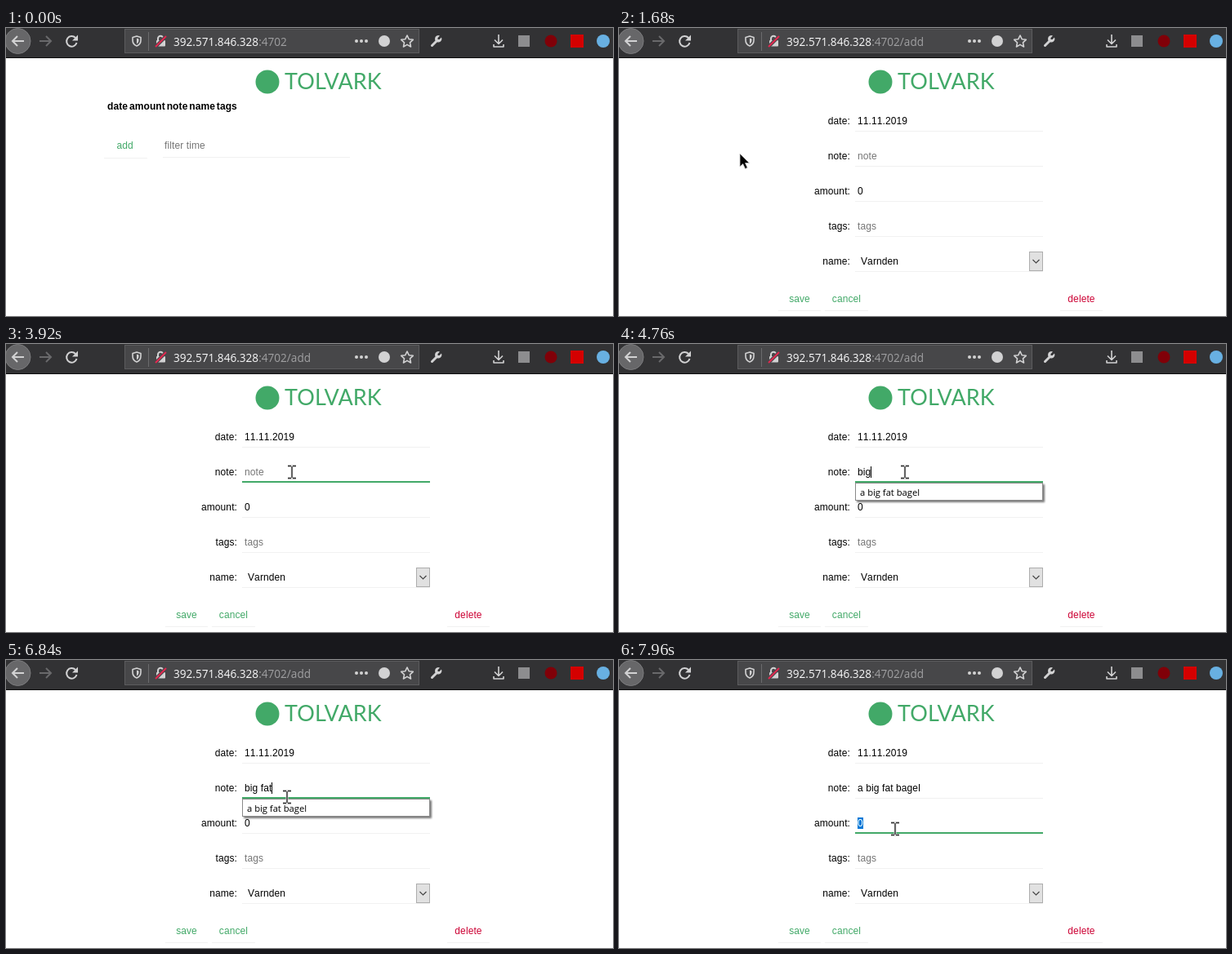
Animation of 743 by 353 pixels, one loop 8 s. Source, as an HTML page:

```html
<!DOCTYPE html>
<html lang="en">
<head>
<meta charset="utf-8">
<title>Adding an entry</title>
<style>
  html, body { margin: 0; width: 100%; height: 100%; overflow: hidden; background: #fff; }
  svg { display: block; width: 100%; height: 100%; }
  text { font: 12px "Liberation Sans", Arial, sans-serif; font-kerning: none; letter-spacing: .1px; white-space: pre; }
  .ui { font-family: "Open Sans", "Noto Sans", sans-serif; letter-spacing: 0; }
  .green { fill: #42a968; }
  .hint { fill: #757575; }
  .line { fill: #f1f1f1; }
  .icon { fill: none; stroke: #d2d2d3; stroke-width: 2; }
  .thin { stroke-width: 1.6; stroke-linejoin: round; }
  #option { filter: drop-shadow(2px 2px 1px #0008); }
</style>
</head>
<body>
<svg viewBox="0 0 743 353">
  <rect width="743" height="353" fill="#fff"/>

  <g id="toolbar">
    <rect width="743" height="37" fill="#323234"/>
    <rect y="36" width="743" height="1" fill="#0c0c0d"/>
    <circle cx="14.500" cy="16" r="15.500" fill="#676769" stroke="#7b7b7d"/>
    <path class="icon" d="M22 16H8M14 10L8 16L14 22"/>
    <path class="icon" d="M41 16H55M49 10L55 16L49 22" style="stroke:#69696b"/>
    <path class="icon" d="M85 12A6.300 6.300 0 1 0 86.500 18"/>
    <path d="M88 8.500V15.500H81Z" fill="#d2d2d3"/>
    <rect x="145.500" y="1.500" width="360" height="29" fill="#474749" stroke="#5c5c5e"/>
    <path class="icon thin" d="M160 10L165 11.500V15Q165 20 160 22Q155 20 155 15V11.500Z"/>
    <path d="M160 12.500L162.500 13.500V16Q162 18.500 160 19.500Z" fill="#d2d2d3"/>
    <rect x="174" y="5" width="1" height="23" fill="#6b6b6d"/>
    <path class="icon" d="M186 15V13A3.200 3.200 0 0 1 192.400 13V15"/>
    <rect x="184" y="15" width="11" height="7.500" rx="1" fill="#d2d2d3"/>
    <path d="M183 23L196 10" stroke="#474749" stroke-width="4"/>
    <path d="M183 23L196 10" stroke="#e22850" stroke-width="2"/>
    <text class="ui" x="205" y="21.500" fill="#f9f9fa" style="font-size:13.600px">392.571.846.328<tspan id="path" fill="#a0a0a2"></tspan></text>
    <g fill="#d2d2d3">
      <circle cx="429" cy="16" r="2"/><circle cx="435" cy="16" r="2"/><circle cx="441" cy="16" r="2"/>
      <circle cx="463" cy="16" r="7"/>
    </g>
    <path class="icon thin" d="M491 9L493.200 13.700L498.300 14.300L494.500 17.800L495.500 23L491 20.400L486.500 23L487.500 17.800L483.700 14.300L488.800 13.700Z"/>
    <path d="M521.500 21.500L527 16" stroke="#d2d2d3" stroke-width="3" stroke-linecap="round"/>
    <path d="M531 9.500L528.500 12V14H530.500L533 11.500A4.200 4.200 0 1 1 531 9.500Z" fill="#d2d2d3"/>
    <path class="icon thin" d="M603 8V19M598 14.500L603 19.500L608 14.500M597 20V23H609V20"/>
    <rect x="627" y="9" width="14" height="14" fill="#8d8d8f"/>
    <circle cx="667" cy="16" r="7.500" fill="#800008"/>
    <rect x="691" y="8" width="16" height="16" fill="#d40000"/>
    <circle cx="731" cy="16" r="8" fill="#68b0e2"/>
  </g>

  <circle class="green" cx="320" cy="66" r="14.500"/>
  <text class="green" x="341" y="75" style="font:27px Lato,sans-serif">TOLVARK</text>

  <g id="list">
    <text x="124" y="100" style="font-weight:bold;word-spacing:-1.600px">date amount note name tags</text>
    <rect class="line" x="120" y="159" width="53" height="1"/>
    <g id="hover">
      <rect x="118" y="130" width="55" height="31" rx="2" fill="#f1f1f1"/>
      <path class="green" d="M118 159H173Q173 161 171 161H120Q118 161 118 159Z"/>
    </g>
    <text id="add" x="135.500" y="148">add</text>
    <text class="hint" x="194" y="148">filter time</text>
    <rect class="line" x="192" y="158" width="229" height="1"/>
  </g>

  <g id="form">
    <g id="rows"></g>
    <text x="292" y="118">11.11.2019</text>
    <text id="note" x="292" y="161"></text>
    <rect id="caret" y="150" width="1" height="14"/>
    <rect id="selection" x="292" y="193" width="7" height="14" fill="#0078d7"/>
    <text id="amount" x="292" y="204">0</text>
    <text class="hint" x="292" y="247">tags</text>
    <text x="296" y="290">Varnden</text>
    <rect x="502.500" y="274.500" width="16" height="23" fill="#e1e1e1" stroke="#adadad"/>
    <path d="M506.500 284L510.500 288L514.500 284" fill="none" stroke="#444" stroke-width="1.200"/>
    <g id="buttons"></g>
    <rect id="focus" class="green" x="289" width="230" height="2"/>
    <g id="popup">
      <rect id="option" x="289.500" y="170.500" width="229" height="21" stroke="#8a8a8a"/>
      <text id="optionText" class="ui" x="295" y="186" style="font-size:11.200px">a big fat bagel</text>
    </g>
  </g>

  <g id="pointer">
    <circle id="click" r="12" cx="0" cy="-1" fill="#ffee00" opacity=".6"/>
    <path id="arrow" d="M0 0V16L3.700 12.600L6.500 18.500L9.200 17.300L6.500 11.500H11.500Z" stroke="#ccc" stroke-width=".8"/>
    <path id="hand" d="M-1.700 1Q0 -1 1.700 1V7L8 8.500Q9.500 9 9.500 11L8.500 16L7 20.500H-1.500L-6 13.500Q-7 11 -5 10.500L-1.700 13Z" stroke="#fff"/>
    <g id="beam" fill="none">
      <path d="M-5 -7.500H5M-5 7.500H5M0 -7V7" stroke="#ddd" stroke-width="3"/>
      <path d="M-5 -7.500H-1M1 -7.500H5M-5 7.500H-1M1 7.500H5M0 -7V7" stroke="#333" stroke-width="1.400"/>
    </g>
  </g>
</svg>

<script>
const LOOP = 8000, STEP = 40;
const el = id => document.getElementById(id);
const show = (id, on) => el(id).setAttribute('display', on ? 'inline' : 'none');
const set = (id, name, value) => el(id).setAttribute(name, value);
const between = (v, from, to) => v >= from && v < to;

el('rows').innerHTML = ['date', 'note', 'amount', 'tags', 'name'].map((label, i) => `
  <text x="283" y="${118 + 43 * i}" text-anchor="end">${label}:</text>
  <rect class="line" x="289" y="${126 + 43 * i}" width="230" height="1"/>`).join('');

el('buttons').innerHTML = [['save', 195, 52, '#42a968'], ['cancel', 252, 53, '#42a968'], ['delete', 540, 52, '#cc0033']]
  .map(([label, x, width, color]) => `
  <text x="${x + width / 2}" y="336" text-anchor="middle" fill="${color}">${label}</text>
  <rect class="line" x="${x}" y="346" width="${width}" height="1"/>`).join('');

// time, x, y of the pointer hotspot
const route = [
  [80, 601, 326], [640, 143, 157], [760, 143, 157], [800, 142, 154],
  [1640, 142, 154], [1680, 148, 154], [2000, 260, 145], [2280, 363, 150],
  [2400, 363, 150], [2680, 350, 157], [6560, 350, 157], [7080, 340, 177],
  [7440, 340, 177], [7800, 338, 207], [LOOP, 338, 207]
];
const typing = [[4440, 'b'], [4640, 'bi'], [4760, 'big'], [4960, 'big '], [5320, 'big f'],
  [5480, 'big fa'], [5640, 'big fat'], [7360, 'a big fat bagel']];
const clicks = [[960, 1040], [3400, 3440], [7280, 7360], [7920, 7960]];
const caretOn = [[3440, 3920], [4440, 6000], [6560, 7080], [7360, 7880]];
const within = (t, spans) => spans.some(([from, to]) => between(t, from, to));

function pointerAt(t) {
  const i = Math.max(1, route.findIndex(p => p[0] > t));
  const [t0, x0, y0] = route[i - 1], [t1, x1, y1] = route[i];
  const k = Math.max(0, (t - t0) / (t1 - t0)), s = k * k * (3 - 2 * k);
  return [x0 + (x1 - x0) * s, y0 + (y1 - y0) * s];
}

function draw(t) {
  const [x, y] = pointerAt(t);
  const onForm = t >= 1040;
  const popup = between(t, 4680, 7360);
  const hand = t < 1120 && between(x, 118, 173) && between(y, 130, 161);
  const beam = onForm && between(x, 289, 519) && (between(y, 147, 170) || !popup && between(y, 190, 213));

  el('path').textContent = onForm ? ':4702/add' : ':4702';
  show('list', !onForm);
  show('form', onForm);
  show('hover', hand);
  set('add', 'fill', hand ? '#000' : '#42a968');
  set('add', 'text-decoration', hand ? 'underline' : 'none');

  const typed = typing.filter(([from]) => t >= from).pop()?.[1] || '';
  const note = el('note');
  note.textContent = typed || 'note';
  set('note', 'fill', typed ? '#000' : '#757575');
  show('caret', within(t, caretOn));
  if (onForm) set('caret', 'x', 292 + (typed ? Math.floor(note.getComputedTextLength()) : 0));

  const amountFocus = t >= 7960;
  show('focus', t >= 3440);
  set('focus', 'y', amountFocus ? 211 : 168);
  show('selection', amountFocus);
  set('amount', 'fill', amountFocus ? '#fff' : '#000');

  const chosen = y >= 170;
  show('popup', popup);
  set('option', 'fill', chosen ? '#0078d7' : '#fff');
  set('optionText', 'fill', chosen ? '#fff' : '#000');

  show('pointer', t >= 80);
  set('pointer', 'transform', `translate(${Math.round(x)} ${Math.round(y)})`);
  show('click', within(t, clicks));
  show('hand', hand);
  show('beam', beam);
  show('arrow', !hand && !beam);
}

const start = performance.now();
function tick() {
  const t = (performance.now() - start) % LOOP;
  draw(Math.floor(t / STEP) * STEP);
  requestAnimationFrame(tick);
}
tick();
</script>
</body>
</html>
```
